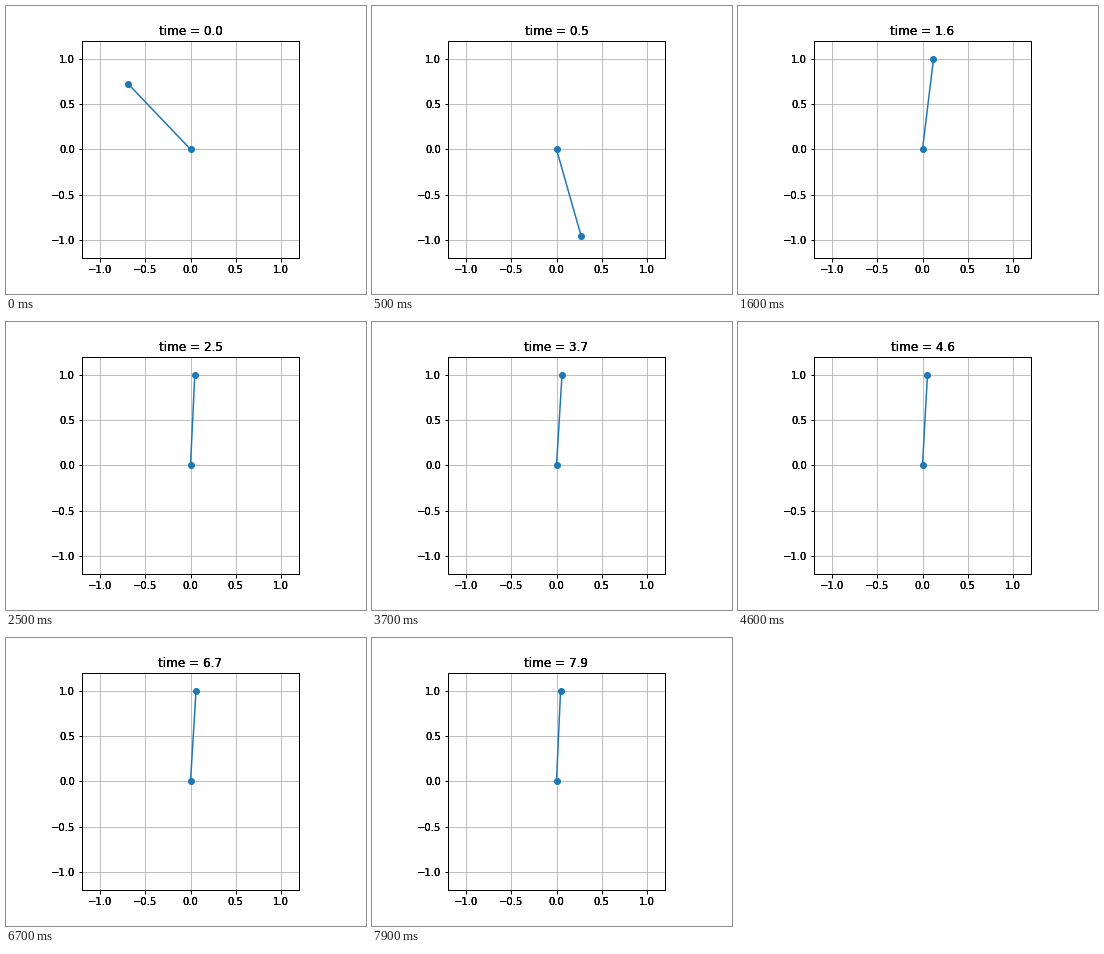
A matplotlib script that plays this animation: 360x288 px, repeating every 8 s.

```python
import numpy as np
import matplotlib.pyplot as plt
from matplotlib.animation import FuncAnimation

DPI = 72
FRAMES, INTERVAL = 80, 100
BLUE = "#1f77b4"
TICKS = np.arange(-1, 1.01, 0.5)

plt.rcParams.update({"font.family": "DejaVu Sans", "font.size": 10})


def swing(steps=10, angle=0.762, speed=1.93, dt=0.05):
    """Free fall of a rod pendulum, two Euler substeps per frame."""
    path = [angle]
    for _ in range(steps):
        for _ in range(2):
            speed += 15 * np.sin(angle) * dt
            angle += speed * dt
        path.append(angle)
    return path


SWING = swing()


def angle_at(i):
    """Angle from upright, counterclockwise: swing up, then balance."""
    if i < len(SWING):
        return SWING[i]
    t = i * INTERVAL / 1000
    rest, fade = 0.052, np.exp(-3.6 * (t - 1))
    start = 2 * np.pi - SWING[-1]
    wobble = 0.009 * np.cos(2 * np.pi * (t - 3.7) / 0.75)
    return -(rest + (start - rest) * fade + wobble * (1 - fade))


fig = plt.figure(figsize=(360 / DPI, 288 / DPI), dpi=DPI, facecolor="white")
side = 217.44
ax = fig.add_axes([75.78 / 360, 36 / 288, side / 360, side / 288])
ax.set(xlim=(-1.2, 1.2), ylim=(-1.2, 1.2), xticks=TICKS, yticks=TICKS,
       facecolor="#fefefe")
ax.tick_params(labelbottom=False, labelleft=False, width=1)
ax.grid(color="#b0b0b0", linewidth=0.8)
for spine in ax.spines.values():
    spine.set_linewidth(1)


def heavy_text(text, xy, coords, offset, **style):
    """Overlaid copies give the text hard, dark edges."""
    return [ax.annotate(text, xy, xycoords=coords, xytext=offset,
                        textcoords="offset points", **style)
            for _ in range(3)]


for v in TICKS:
    label = f"{v:.1f}".replace("-", "\u2212")
    heavy_text(label, (v, 0), ax.get_xaxis_transform(), (0, -7),
               ha="center", va="top")
    heavy_text(label, (0, v), ax.get_yaxis_transform(), (-7, 0),
               ha="right", va="center_baseline")

title = heavy_text("", (0.5, 1), "axes fraction", (0, 6),
                   ha="center", va="baseline", fontsize=12)
rod, = ax.plot([], [], "o-", color=BLUE, linewidth=1.5, markersize=6)


def update(i):
    a = angle_at(i)
    rod.set_data([0, -np.sin(a)], [0, np.cos(a)])
    for copy in title:
        copy.set_text(f"time = {i * INTERVAL / 1000:.1f}")
    return [rod, *title]


anim = FuncAnimation(fig, update, frames=FRAMES, interval=INTERVAL,
                     repeat=True, repeat_delay=0, blit=False)
plt.show()
```
